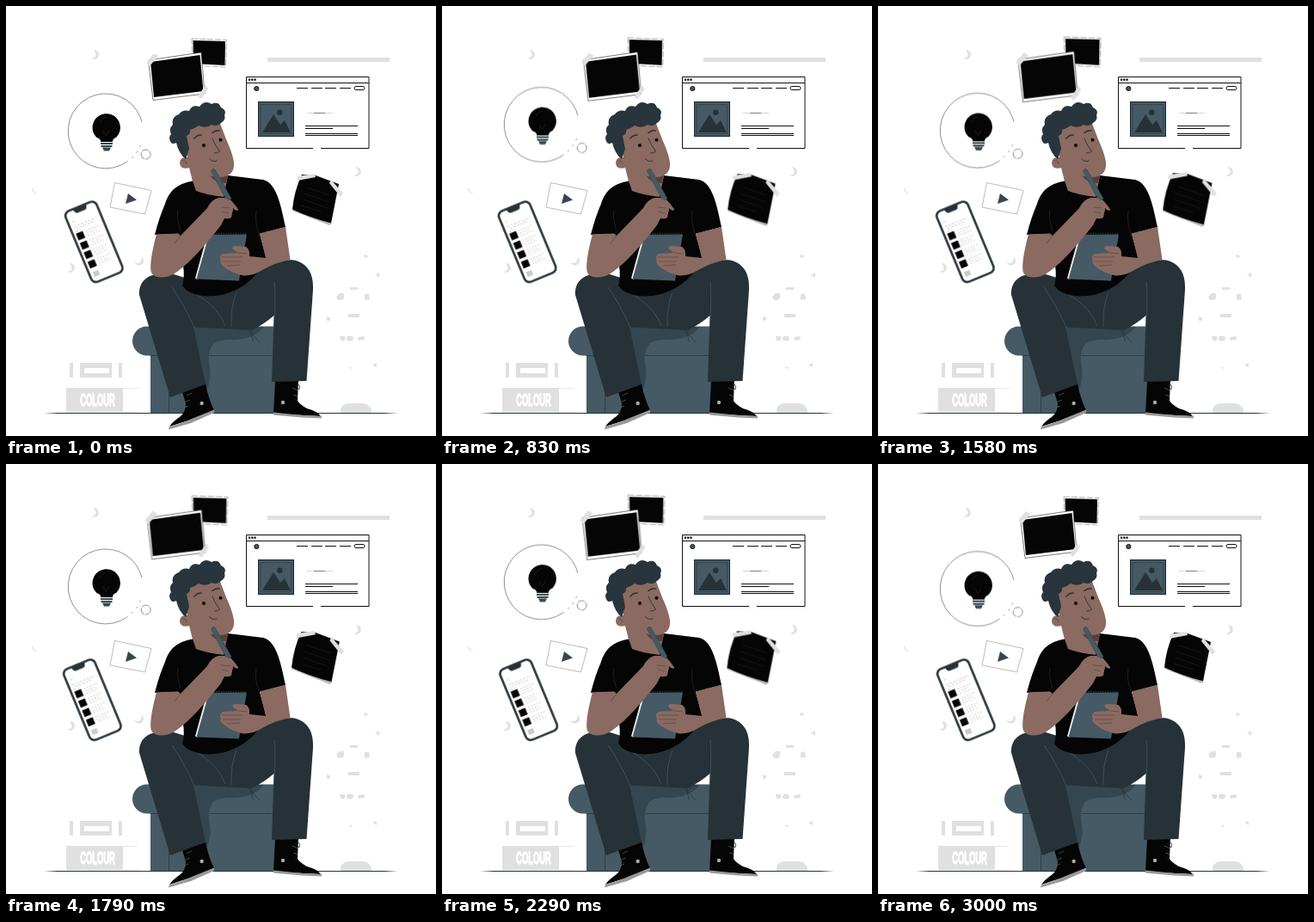
Animation of 500 by 500 pixels, one loop 3.04 s. Source, as an HTML page without scripts:

```html
<!DOCTYPE html>
<html lang="en">
<head>
<meta charset="utf-8">
<title>Thinking of ideas</title>
<style>
html, body { margin: 0; width: 100%; height: 100%; overflow: hidden; background: #fff; }
svg { display: block; width: 100%; height: 100%; }
.grey { fill: #e0e0e0; }
.dark { fill: #263238; }
.slate { fill: #455a64; }
.skin { fill: #8a6a61; }
.ink { fill: #050505; }
.line { fill: none; stroke: #263238; stroke-linecap: round; stroke-linejoin: round; }
.float { animation: float 1.52s linear infinite; }
.beat { animation: beat 3.04s ease-in-out infinite; }
.sway { animation: sway 3.04s ease-in-out infinite; }
@keyframes float { 50% { transform: translateY(-8.3px); } }
@keyframes beat {
  0%, 14%, 33%, 45%, 66%, 84%, 100% { transform: scale(1); }
  7%, 21%, 75% { transform: scale(1.055); }
  52.5% { transform: scale(1.06); }
}
@keyframes sway {
  0%, 14%, 84%, 100% { transform: translateX(0); }
  28%, 36% { transform: translateX(-3.1px); }
  51% { transform: translateX(-.9px); }
  67% { transform: translateX(-3px); }
}
</style>
</head>
<body>
<svg viewBox="0 0 500 500">
  <defs>
    <path id="moon" d="M-1 -5.5A5.5 5.5 0 1 1 -3.5 4.6Q5 3 -1 -5.5Z"/>
    <g id="row">
      <rect x="-15.8" y="-4.2" width="8.4" height="8.4" class="ink"/>
      <path d="M-4 -3H12M-4 0H8M-4 3H11" fill="none" stroke="#999" stroke-width=".5" stroke-dasharray="2 1.5"/>
    </g>
  </defs>

  <!-- background -->
  <g class="grey">
    <rect x="304" y="60" width="142" height="5"/>
    <use href="#moon" x="103" y="56.5"/>
    <use href="#moon" x="408" y="192.5"/>
    <use href="#moon" x="75" y="304.5"/>
    <use href="#moon" transform="translate(155 296.5) rotate(40)"/>
    <path d="M31 211Q32 217 37 218Q32 219 30 213Z"/>
    <path d="M416 290L419 289L421 292L417 293ZM429 313L434 310V316ZM400 327H409V330H400ZM384 338L388 334H393V340L390 342H386ZM417 335L422 334.5L423 341L417 342ZM373 361L378 363L375 367L373 365ZM398 358H411V362H398ZM388 384H394V389H389ZM396 385Q400 382 404 385V388Q400 391 396 388ZM409 385L416 384L417 388L410 389ZM398 420L403 420L402 422ZM426 417L431 415V420ZM416 452L418 453Z"/>
    <path d="M389 473Q388 464 397 462H415Q425 463 425 473Z"/>
    <path d="M74 415H78V432H74ZM131 415H135V432H131ZM86 415H123V432H86ZM91 421V427H120V421Z" fill-rule="evenodd"/>
    <rect x="70" y="444" width="66" height="28.5"/>
    <path d="M136 444H153V444.7H136ZM136 472H153V472.5H136Z"/>
  </g>
  <text transform="translate(86.300 465.300) scale(.48 1)" font-family="'Liberation Sans', Arial, sans-serif" font-weight="700" font-size="19.5" fill="#fff" stroke="#fff" stroke-width="1" vector-effect="non-scaling-stroke">COLOUR</text>
  <path class="dark" d="M44 473.5L60 473H440L456 473.5L440 474H60Z"/>

  <!-- browser window -->
  <g fill="none" stroke="#111">
    <path d="M357 165.500H279.500V82.500H422V165.500H366M280 89.500H422"/>
    <path d="M338 95.500H351M355 95.500H368M371 95.500H384M388 95.500H401M348 139.500H409M348 142.500H380M348 148.500H409M348 150.500H409"/>
    <path d="M350 124.500H380" stroke="#aaa" stroke-width=".5"/>
    <path d="M358 124.500H371" stroke="#444" stroke-width=".6"/>
    <rect x="405" y="93.500" width="12" height="4" rx="2"/>
    <circle cx="291.300" cy="96" r="2.600" fill="#455a64"/>
  </g>
  <path class="ink" d="M282 84.500h2.200v2.200h-2.200zM285.200 84.500h2.200v2.200h-2.200zM288.400 84.500h2.200v2.200h-2.200z"/>
  <rect x="293.500" y="111.500" width="41" height="40" class="slate" stroke="#1c262b"/>
  <rect x="296.500" y="114.500" width="35" height="34" class="line" stroke-width=".5"/>
  <path class="dark" d="M298 147L311 126L319 138L324 133L331 147Z"/>
  <circle cx="318.300" cy="123.800" r="3.300" class="dark"/>

  <!-- video card -->
  <path d="M126.500 205.500L169 214.500L161.500 242L121 234Z" fill="none" stroke="#777" stroke-width=".5"/>
  <path d="M142 218L152 225.500L139 230Z" fill="#37474f"/>

  <!-- idea bulb -->
  <g class="float">
    <g fill="none" stroke="#333" stroke-width=".55">
      <path d="M156 129A43.500 43.500 0 1 0 140 181.500"/>
      <path d="M140 181.500A43.500 43.500 0 0 0 158 158" stroke-dasharray="2 6"/>
      <path d="M156 129L158 135"/>
      <circle cx="162.600" cy="172.500" r="5.500" stroke-dasharray="9 1"/>
    </g>
    <path class="ink" d="M100.500 141.500A16.200 16.200 0 1 1 128.500 152.500Q124 154 123.800 158H110.300Q110 154 105.500 153Q100.500 148 100.500 141.500Z"/>
    <path d="M110 159H124V161H110ZM110.500 162H123.500V164H110.500ZM112 164.500H122L120 168.500H114Z" fill="#37474f"/>
    <path d="M109 135Q112 130 117 129M113 145L116 151L120 145" fill="none" stroke="#262626" stroke-width=".7"/>
  </g>

  <!-- photos -->
  <g class="beat" style="transform-origin:211px 74px">
    <path d="M216 38L256.500 39.500L255.500 71L217 69Z" fill="#fff" stroke="#777" stroke-width=".6" stroke-dasharray="7 2"/>
    <path class="ink" d="M217.500 40L255 41L254.500 69L218 67Z"/>
    <path d="M165.500 63L227 54L231 102L171 109.500Z" fill="#fff" stroke="#222" stroke-width=".6"/>
    <path class="ink" d="M168 65L225.500 57L229.500 99L172 106Z"/>
    <path class="grey" d="M163 66L172 55L177 58L167 70ZM223 105L232 92L235 96L227 108Z"/>
  </g>

  <!-- sticky note -->
  <g class="beat" style="transform-origin:362px 225px">
    <path d="M333 238L376 255L379 253L334 235Z" fill="#bbb"/>
    <path class="ink" d="M344 196L360 197L387 207L378 252.500Q353 246 333 236.500Q335 215 344 196Z"/>
    <path d="M350 211L377 220M347 218L376 228M346 225L374 235M344 232L366 239" fill="none" stroke="#222" stroke-width=".6"/>
    <path class="grey" d="M339 198L359 195L360 199L339 203ZM378 202L392 218L389 222L376 206Z"/>
  </g>

  <!-- phone -->
  <g class="sway">
    <g transform="translate(102.300 274.300) rotate(-22.500)">
      <rect x="-19.500" y="-44.500" width="39" height="89" rx="6" fill="#fff" stroke="#263238" stroke-width="2.600"/>
      <path class="dark" d="M-9 -45H9L7 -40Q6 -38.500 4 -38.500H-4Q-6 -38.500 -7 -40Z"/>
      <path d="M-15 -31H-12M-15 -25H13M-15 -19H-9M-13 -22H8" fill="none" stroke="#aaa" stroke-width=".6" stroke-dasharray="3 1.500"/>
      <use href="#row" y="-12.600"/>
      <use href="#row" y="-.8"/>
      <use href="#row" y="11"/>
      <use href="#row" y="22.800"/>
      <rect x="-15" y="32" width="7" height="6" fill="#ccc"/>
    </g>
  </g>

  <!-- pouf -->
  <path class="slate" d="M164 372.500H335V473H168V406.500H164A17 17 0 0 1 164 372.500Z"/>
  <path d="M200 373H300Q288 388 264 388Q243 387 239 396Q234 405 237 420Q239 432 234 445L205 445Z" fill="#34464f"/>
  <path class="line" stroke-width=".7" d="M168 406.500H190M237 406.500H312M189.500 408V473M282 377L295 391M284 374L287 390"/>

  <!-- shoes -->
  <path class="ink" d="M205 449L232 439Q235 456 242 470L215 481L190 489Q193 484 203 477Q209 472 209 462Z"/>
  <path d="M190 488.500Q204 486 216 480L242 469.500V473L215 485L189 492.500Z" fill="#999"/>
  <path class="ink" d="M313 436L340 435L339 459Q341 463 350 468Q362 471 366 477L311 474Z"/>
  <path d="M311 472.500L345 476L367 477V479.500L345 478.500L311 475.500Z" fill="#999"/>
  <g fill="#aaa"><circle cx="227.700" cy="462" r="2.200"/><circle cx="322" cy="461" r="2.200"/></g>
  <path d="M210 453L216 450M209 460L214 458M207 467L212 465M333 444L339 447M334 452L339 454" stroke="#777" stroke-width=".6"/>
  <path class="line" stroke-width=".8" d="M338 440Q343 439 341 446L337 442"/>

  <!-- trousers -->
  <path class="dark" d="M155 336C154 317 169 309 192 311L208 316Q250 330 288 311C305 300 321 294 335 295.500C351 299 358 312 357 330L349.500 436L309 437L311.500 360Q300 370 286 377L218 373.500L232 440L191 455Z"/>
  <path d="M193 327Q206 345 219 374M206 327Q245 345 255 372M262 373Q261 350 268 333M312 321Q314 345 311 374" fill="none" stroke="#52656f" stroke-width=".6"/>

  <!-- neck and shirt -->
  <path class="skin" d="M212 184L217 204L220 217Q235 228 254 222L258 196Z"/>
  <path class="ink" d="M217 203.500C198 207 190 215 185 230Q178 246 173 266L200 265L206 302Q208 315 205 325C215 342 262 345 291 312L303 294L295 265L325 257C319 228 314 206 299 202L258 197L253 222Q234 220 221 215Z"/>
  <path d="M294 265Q289 250 291 238M203 262Q198 245 200 237" fill="none" stroke="#303030" stroke-width=".6"/>
  <path d="M237 197Q248 201 258 197L256 206Q244 207 237 197Z" fill="#593f3a"/>

  <!-- head -->
  <path class="skin" d="M206 150L216 140L248 134L256 155Q266 177 265 186Q264 197 252 198.500Q238 199 226 194L214 188Q203 191 202 183Q202 175 211 176Z"/>
  <path d="M205 180Q209 179 210 184" fill="none" stroke="#573f39" stroke-width=".7"/>
  <path d="M192 159Q188 153 192 149Q189 142 194 138Q192 129 201 126Q205 120 213 122Q216 114 225 117Q231 109 239 114Q247 110 250 118Q257 121 254 127Q256 132 250 136Q246 141 239 138Q232 143 224 139Q219 143 214 144Q215 149 210 151L213 166L209 178Q201 172 198 159Q194 161 192 159Z" fill="#28353c"/>
  <g class="ink"><circle cx="230" cy="162" r="2"/><circle cx="249.500" cy="155.800" r="2"/></g>
  <path class="line" stroke-width="1.600" d="M219 154Q222 150 227 150M240 147.500Q244 144 248 145"/>
  <path class="line" stroke-width=".9" d="M240 154Q243 162 248.500 169Q246 171.500 242.500 171M236.500 177.500Q240 182 245 180"/>

  <!-- notebook and right arm -->
  <path d="M234 265.500L220 316.500L223 318L238 268Z" fill="#eee"/>
  <path class="slate" d="M236 266L280 265.500L271 319.500L221.500 317.500Z"/>
  <path d="M236 265H279" stroke="#263238" stroke-width="2.600" stroke-dasharray="1.200 1.600"/>
  <path class="skin" d="M295 264.500L325 256.700L330.500 295Q314 298 298 307Q287 314 276 313.500Q263 311 253 303Q248 299 250 296Q247 291 252 288L270 287L264 283Q262 279 267 279L279 280Q284 283 283 291L302 293Z"/>
  <path d="M251 292H275M252 297L273 297M257 302L272 301M270 287L280 288" fill="none" stroke="#51413d" stroke-width=".6"/>

  <!-- left arm with pencil -->
  <path class="skin" d="M175 265.500L200 264.500L203 267L234 235Q239 225 247 223L259 223Q265 229 270.500 237Q267 239 264 235L262 246Q259 248 254 247L250 255C238 270 216 298 196 311C185 318 170 317 168.500 308C167 299 171 280 175 265.500Z"/>
  <path class="slate" d="M238.500 192Q240 188 243 190L262 224L257 227Z" stroke="#37474f" stroke-width=".6"/>
  <path class="skin" d="M247 224Q256 222 261 228L264 237L261 246L256 247Q258 238 250 234Z"/>
  <path d="M250 234L261 235M251 239L259 241M203 267L196 276" fill="none" stroke="#51413d" stroke-width=".6"/>
</svg>
</body>
</html>
```
